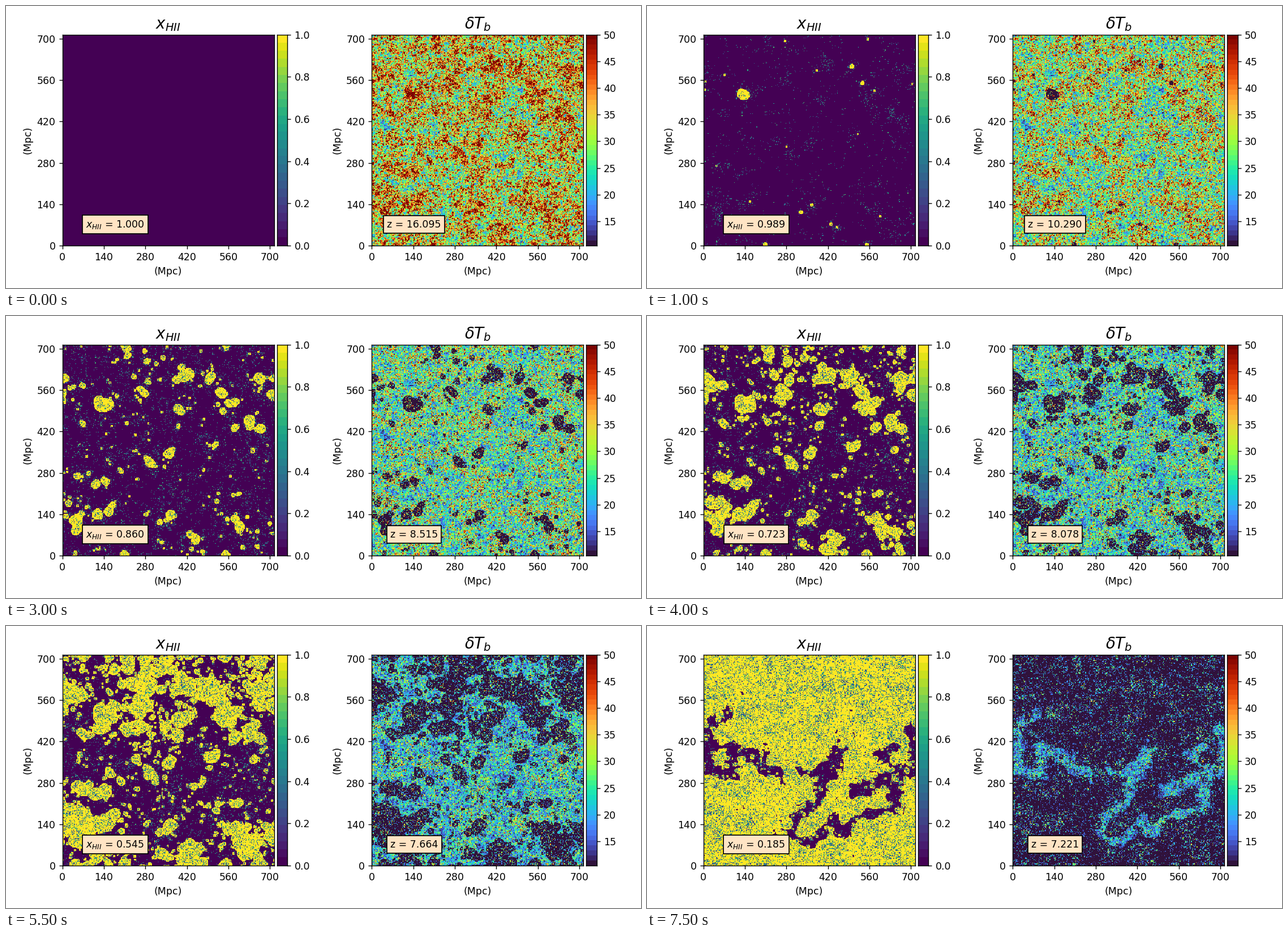
A matplotlib script for the animation above (8 s loop, 1122 px wide and 499 px high).

```python
import numpy as np
import matplotlib.pyplot as plt
from matplotlib.animation import FuncAnimation

# At 72 dpi one point is one pixel.
W, H, PANEL, N, FRAMES = 1122, 499, 374, 300, 16
FONT = 17.36
plt.rcParams.update({
    "font.family": "DejaVu Sans", "font.size": FONT, "axes.linewidth": 1.39,
    "axes.titlesize": 1.6 * FONT, "axes.titlepad": 0.6 * FONT, "axes.labelpad": 0.4 * FONT,
    **{f"{a}tick.major.{k}": v for a in "xy"
       for k, v in (("size", 6.08), ("width", 1.39), ("pad", 6.08))},
})

# Key points of the history: step, redshift, neutral fraction.
STEP, REDSHIFT, NEUTRAL = zip(
    (0, 16.095, 1.000), (2, 10.290, 0.989), (4, 9.164, 0.936), (6, 8.515, 0.860),
    (9, 7.859, 0.654), (11, 7.664, 0.545), (15, 7.221, 0.185))

# Panel positions in pixels from the top left.
BIG_BUBBLES = [(145, 45), (180, 15), (268, 70), (355, 45), (8, 70), (65, 115),
               (145, 110), (25, 305), (205, 362), (325, 325)]
FILAMENTS = [
    [(52, 104), (5, 128), (8, 200), (45, 215), (50, 165), (130, 210), (215, 208), (250, 166)],
    [(215, 208), (195, 262), (155, 300), (178, 335), (205, 315)],
    [(232, 298), (245, 312), (275, 288), (335, 275), (345, 205), (318, 180), (368, 135)],
    [(368, 165), (370, 200), (300, 225), (275, 245)],
]

rng = np.random.default_rng(21)
cells = (np.arange(N) + 0.5) * PANEL / N
X, Y = np.meshgrid(cells, cells)
freq = np.fft.fftfreq(N)
K = np.hypot(*np.meshgrid(freq, freq))


def standard(a):
    return (a - a.mean()) / a.std()


def filtered(a, response):
    return standard(np.fft.ifft2(np.fft.fft2(a) * response).real)


def bubbles_of_radius(r):
    smooth = filtered(density, np.exp(-2 * (np.pi * K * 0.75 * r) ** 2))
    disc = [(i, j) for i in range(-r, r + 1) for j in range(-r, r + 1)
            if i * i + j * j <= r * r + 1]
    return np.max([np.roll(smooth, s, (0, 1)) for s in disc], axis=0)


def near_path(path, width):
    d2 = np.full((N, N), np.inf)
    for (x0, y0), (x1, y1) in zip(path, path[1:]):
        dx, dy = x1 - x0, y1 - y0
        t = np.clip(((X - x0) * dx + (Y - y0) * dy) / (dx * dx + dy * dy), 0, 1)
        d2 = np.minimum(d2, (X - x0 - t * dx) ** 2 + (Y - y0 - t * dy) ** 2)
    return np.exp(-d2 / width ** 2)


def top(a, fraction):
    return a > np.quantile(a, 1 - fraction)


large = np.max([np.exp(-((X - x) ** 2 + (Y - y) ** 2) / 26 ** 2)
                for x, y in BIG_BUBBLES], axis=0)
shielded = np.max([near_path(p, 18) for p in FILAMENTS], axis=0)
density = filtered(rng.normal(size=(N, N)), np.maximum(K, 0.015) ** -0.65)
density = standard(density + 0.3 * large)
clumps = standard(np.max([bubbles_of_radius(r) for r in (1, 2, 4)], axis=0))
faint = rng.normal(size=(N, N)) + 0.6 * clumps
residue = rng.normal(size=(N, N)) + 0.7 * density
shade = rng.random((N, N))


def ionization_history():
    bubbles = np.zeros((N, N), bool)
    for i in range(FRAMES):
        q = 1 - np.interp(i, STEP, NEUTRAL)
        score = clumps + 2.5 * q * large - 5 * q ** 2 * shielded
        score[bubbles] = np.inf
        bubbles = bubbles | (score > np.sort(score, axis=None)[
            int((1 - 1.1 * q ** 1.15) * (N * N - 1))])
        speckled = top(faint, 0.35 * q ** 0.6 * (1 - 0.6 * q))
        leftover = top(residue, 0.27 * q ** 0.6)
        yield np.where(bubbles, np.where(leftover, 0.15 + 0.5 * shade, 1),
                       np.where(speckled, 0.2 + 0.5 * shade, 0))


def brightness(z, q, ionized):
    median = 34 * ((1 + z) / 17.1) ** 0.3 * (1 - 0.25 * q)
    return median * np.exp(0.33 * density) * (1 - ionized)


ionized = list(ionization_history())

fig = plt.figure(figsize=(W / 72, H / 72), dpi=72, facecolor="white")


def add_axes(x, width):
    return fig.add_axes([x / W, 75 / H, width / W, (PANEL - 0.6) / H])


def add_panel(x, title, cmap, low, high, bar_ticks, bar_format, text_x):
    ax = add_axes(x, PANEL)
    side = 500 / 0.7
    image = ax.imshow(np.zeros((N, N)), cmap=cmap, vmin=low, vmax=high,
                      extent=(0, side, 0, side), interpolation="nearest", aspect="auto")
    ticks = range(0, 701, 140)
    ax.set(title=title, xlabel="(Mpc)", ylabel="(Mpc)", xticks=ticks, yticks=ticks)
    label = ax.text(text_x, 0.1, "", transform=ax.transAxes, ha="center", va="center",
                    bbox=dict(boxstyle="square,pad=0.36", fc="bisque", ec="black", lw=1.7))
    bar = add_axes(x + PANEL + 5, PANEL / 20)
    bar.imshow(np.linspace(low, high, 512)[:, None], cmap=cmap, vmin=low, vmax=high,
               origin="lower", extent=(0, 1, low, high), interpolation="nearest",
               aspect="auto")
    bar.yaxis.tick_right()
    bar.set(xticks=[], yticks=bar_ticks)
    bar.set_yticklabels([format(t, bar_format) for t in bar_ticks])
    return image, label


gas, gas_label = add_panel(99.6, "$x_{HII}$", plt.get_cmap("viridis", 26), 0, 1,
                           np.arange(6) / 5, ".1f", 0.25)
signal, signal_label = add_panel(646.3, r"$\delta T_b$", plt.get_cmap("turbo", 42),
                                 10.45, 50, range(15, 51, 5), "d", 0.2)


def update(i):
    z, neutral = np.interp(i, STEP, REDSHIFT), np.interp(i, STEP, NEUTRAL)
    gas.set_data(ionized[i])
    signal.set_data(brightness(z, 1 - neutral, ionized[i]))
    gas_label.set_text(f"$x_{{HII}}$ = {neutral:.3f}")
    signal_label.set_text(f"z = {z:.3f}")
    return gas, signal, gas_label, signal_label


anim = FuncAnimation(fig, update, frames=FRAMES, interval=500, repeat=True, repeat_delay=0)
plt.show()
```
